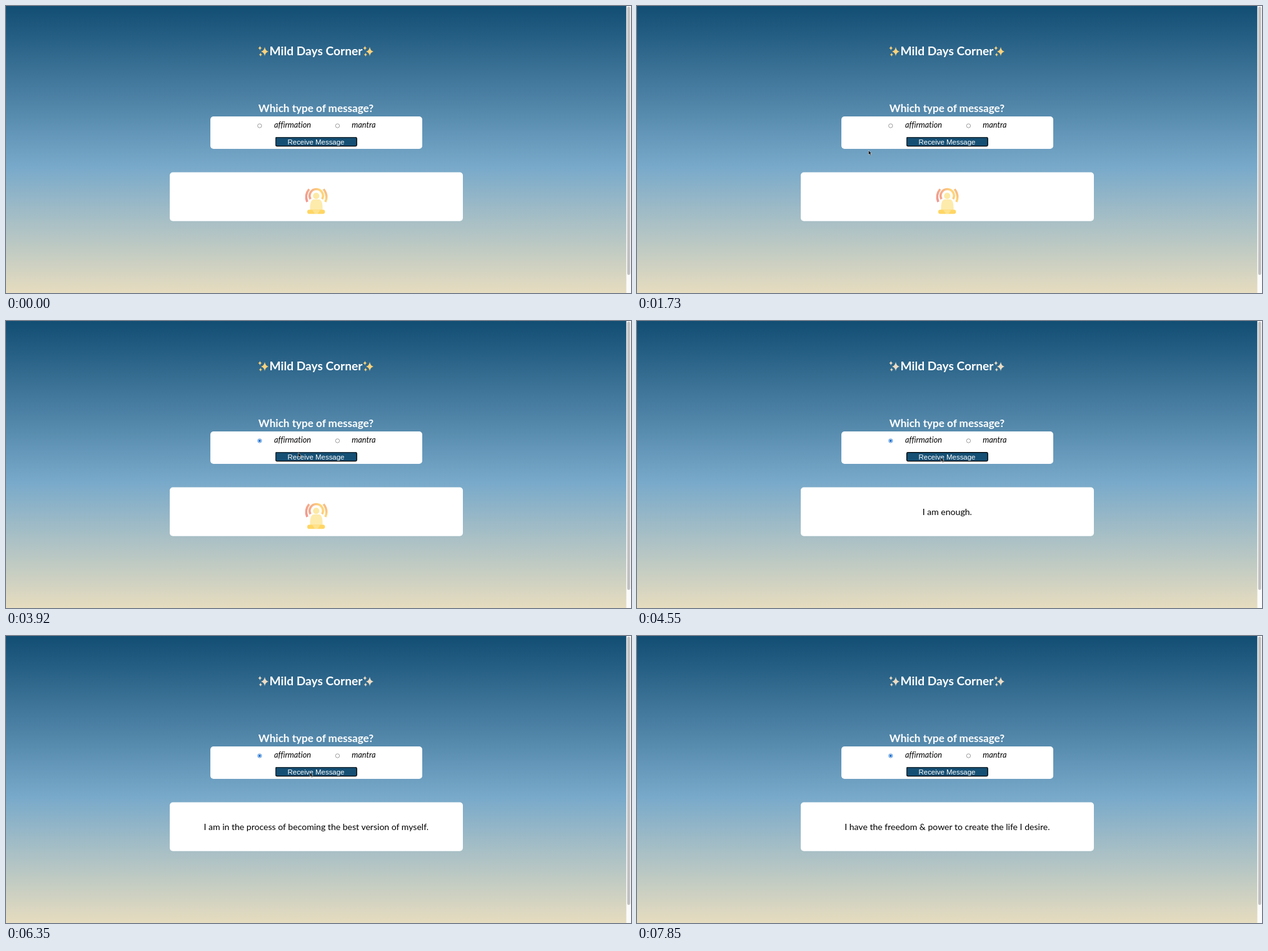
These frames come from a looping animation (1000 px wide and 460 px high, 8000 ms). An HTML page:

```html
<!DOCTYPE html>
<html lang="en">
<head>
<meta charset="utf-8">
<title>Messages</title>
<style>
  html, body { margin: 0; width: 100%; height: 100%; overflow: hidden; }
  svg { display: block; width: 100%; height: 100%; }
  text { font-family: Lato, "Open Sans", sans-serif; font-variant-ligatures: none; }
  .head { fill: #fff; font-weight: 700; text-anchor: middle; }
  .label { font-size: 12.7px; font-style: italic; }
  .button { font-family: "Liberation Sans", Arial, sans-serif; font-size: 11.45px; fill: #fff; text-anchor: middle; }
  #message { font-size: 14.05px; text-anchor: middle; }
  .radio { fill: #fff; stroke: #767676; stroke-width: .7; }
</style>
</head>
<body>
<svg viewBox="0 0 1000 460">
  <defs>
    <linearGradient id="sky" x2="0" y2="1">
      <stop offset="0" stop-color="#124d73"/>
      <stop offset=".56" stop-color="#78a9ca"/>
      <stop offset="1" stop-color="#e6dcbf"/>
    </linearGradient>
    <linearGradient id="warm" gradientUnits="userSpaceOnUse" x1="479" y1="312" x2="514" y2="294">
      <stop offset="0" stop-color="#f0958f"/>
      <stop offset=".45" stop-color="#f8b587"/>
      <stop offset=".75" stop-color="#ffd777"/>
      <stop offset="1" stop-color="#f3a98b"/>
    </linearGradient>
    <g id="sparkles">
      <path d="M414 65.5Q414.9 71.8 420 73Q414.9 74.2 414 80.5Q413.1 74.2 408 73Q413.1 71.8 414 65.5Z"/>
      <path d="M406.3 64Q406.7 67 409 67.5Q406.7 68 406.3 71Q405.9 68 403.6 67.5Q405.9 67 406.3 64Z"/>
      <path d="M407.3 75Q407.7 77.6 409.8 78Q407.7 78.4 407.3 81Q406.9 78.4 404.8 78Q406.9 77.6 407.3 75Z"/>
    </g>
  </defs>

  <rect width="1000" height="460" fill="url(#sky)"/>
  <rect x="992.5" width="7.5" height="460" fill="#fafafa"/>
  <rect x="994" y="1" width="4.6" height="430" rx="2.3" fill="#c1c1c1"/>

  <g id="stars">
    <use href="#sparkles"/>
    <use href="#sparkles" x="168"/>
  </g>
  <text class="head" x="496" y="79.3" font-size="19.2">Mild Days Corner</text>
  <text class="head" x="496" y="170" font-size="17.1">Which type of message?</text>

  <rect x="327" y="177" width="339" height="52" rx="5" fill="#fff"/>
  <circle class="radio" id="ring" cx="405.8" cy="192" r="3.2"/>
  <circle id="dot" cx="405.8" cy="192" r="2" fill="#1b6fd0"/>
  <text class="label" x="429" y="195.4">affirmation</text>
  <circle class="radio" cx="530.4" cy="192" r="3.2"/>
  <text class="label" x="553.3" y="195.4">mantra</text>

  <rect x="431.6" y="210.6" width="129.6" height="14" rx="1.8" fill="#154f74" stroke="#000" stroke-width="1.3"/>
  <path id="bevel" d="M431.6 223.5V212Q431.6 210.6 433 210.6H560" fill="none" stroke="#24343f" stroke-width="1.2"/>
  <text class="button" x="496" y="221.5">Receive Message</text>

  <rect x="262" y="266.5" width="469" height="78.3" rx="5" fill="#fff"/>
  <g id="icon">
    <g fill="none" stroke="url(#warm)" stroke-width="3.6">
      <path d="M482 314Q477.5 303 485 293.5"/>
      <path d="M511 314Q515.5 303 508 293.5"/>
      <path d="M487.2 309.5A10.7 10.7 0 1 1 505.8 309.5"/>
    </g>
    <path d="M486.5 328Q485.8 311 492 310H501Q507.2 311 506.5 328Z" fill="#fdebac"/>
    <circle cx="496.3" cy="304.3" r="5.1" fill="#fde9a5"/>
    <rect x="482" y="326.5" width="28.4" height="6.7" rx="3.3" fill="#ffd665"/>
    <path d="M490 326.5H503L498.5 333H494Z" fill="#fee28c"/>
  </g>
  <text id="message" x="496.3" y="311"></text>

  <path id="cursor" d="M0 0V7L1.7 5.5L2.9 8.2L4.1 7.7L2.9 5.1H5Z" fill="#000" stroke="#fff" stroke-width=".5"/>
</svg>
<script>
const LOOP = 8000;
const HIDE_CURSOR = 7850;
const el = id => document.getElementById(id);
const stars = el('stars'), ring = el('ring'), dot = el('dot'), bevel = el('bevel');
const icon = el('icon'), message = el('message'), cursor = el('cursor');

// press time, release time, message shown on release
const clicks = [
  [4160, 4260, 'I am enough.'],
  [4550, 4630, 'My possibilities are endless.'],
  [4850, 4940, 'I believe I can be all that I want to be.'],
  [5120, 5220, 'I choose to be kind to myself and love myself unconditionally.'],
  [5400, 5530, 'I deserve to be healthy and feel good.'],
  [5710, 5810, 'I honor my body by trusting the signals that it sends me.'],
  [5950, 6050, 'I am full of energy and vitality and my mind is calm and peaceful.'],
  [6250, 6350, 'I am in the process of becoming the best version of myself.'],
  [6510, 6610, 'I manifest perfect health by making smart choices.'],
  [6800, 6900, 'I am worthy of my dreams.'],
  [7090, 7190, 'I forgive myself and set myself free.'],
  [7430, 7530, 'Every day I am getting healthier and stronger.'],
  [7740, 7850, 'I have the freedom & power to create the life I desire.']
];

// time, x, y of the pointer tip
const path = [
  [1310, 334, 388], [1480, 342, 300], [1730, 370.5, 231.5], [2110, 352, 203],
  [2450, 352, 203], [3170, 409.5, 187.5], [3610, 409.5, 187.5], [4020, 486.3, 218.7]
];

function pointAt(t) {
  const i = path.findIndex(p => p[0] > t);
  if (i < 0) return path[path.length - 1].slice(1);
  const [t0, x0, y0] = path[i - 1], [t1, x1, y1] = path[i];
  const k = (t - t0) / (t1 - t0);
  return [x0 + (x1 - x0) * k, y0 + (y1 - y0) * k];
}

const show = (node, on) => node.setAttribute('visibility', on ? 'visible' : 'hidden');

function render(t) {
  const last = clicks.filter(c => t >= c[1]).pop();
  const text = last ? last[2] : '';
  if (message.textContent !== text) message.textContent = text;
  show(icon, !last);
  show(bevel, !clicks.some(c => t >= c[0] && t < c[1]));
  stars.setAttribute('fill', last ? '#ecdcc4' : '#fbd27c');

  const checked = t >= 3350;
  show(dot, checked);
  ring.style.stroke = checked ? '#1b6fd0' : '#767676';

  const visible = t >= path[0][0] && t < HIDE_CURSOR;
  show(cursor, visible);
  if (visible) cursor.setAttribute('transform', `translate(${pointAt(t)})`);
}

const start = performance.now();
function tick() {
  render((performance.now() - start) % LOOP);
  requestAnimationFrame(tick);
}
tick();
</script>
</body>
</html>
```
